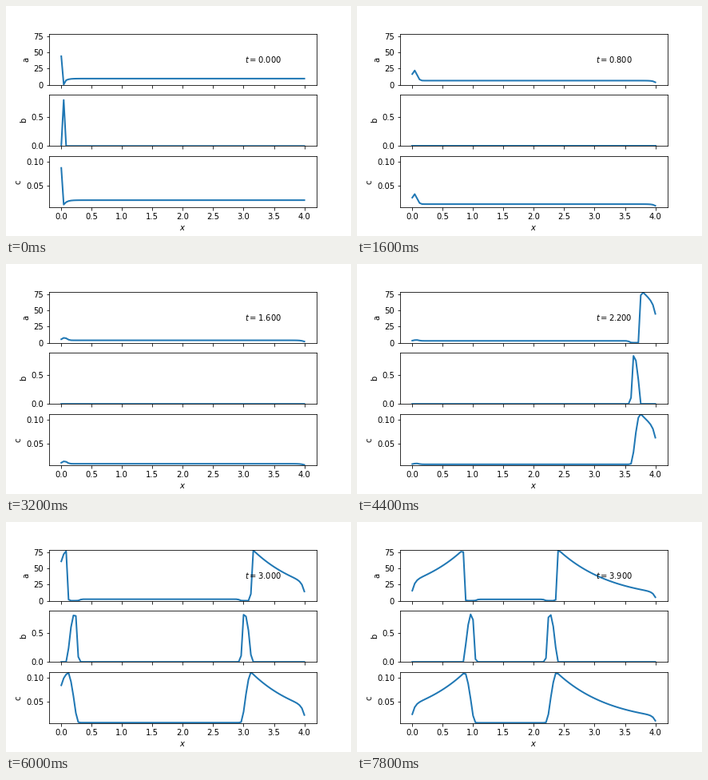
Animation of 432x288 px, one loop 8000 ms. Source, as a matplotlib script:

```python
import numpy as np
import matplotlib.pyplot as plt
from matplotlib.animation import FuncAnimation

plt.rcParams.update({"font.family": "DejaVu Sans", "font.size": 10})

FRAMES, INTERVAL, DT = 40, 200, 0.1
LENGTH = 4.0
ACCEL = 0.0229       # slow speed-up of both fronts
C_REST = 0.0056
C_JUMP = 0.106       # catalyst produced by one pulse
x = np.linspace(0, LENGTH, 101)


def step(u):
    return 0.5 * (1 + np.tanh(u / 2))


def b_pulse(z):
    """Steep front, rounded back; z is the distance behind the front."""
    back = 1 - (np.clip(z, 0, 0.157) / 0.157)**2.4
    return 0.89 * step((z + 0.002) / 0.009) * back


def a_gate(z):
    """a vanishes inside the pulse and returns sharply at its rear."""
    return step((-0.05 - z) / 0.011) + step((z - 0.157) / 0.005)


# c rises as the running integral of b
z_fine = np.linspace(-0.1, 0.2, 301)
c_rise = np.cumsum(b_pulse(z_fine))
c_rise /= c_rise[-1]


def front(t, d, t0, s0, v):
    """Distance behind the front and time since the pulse, at distance d from the wall."""
    tau = t - t0
    z = s0 + v * tau + ACCEL * tau**2 - d
    passed = t0 + (np.sqrt(v**2 + 4 * ACCEL * (d - s0)) - v) / (2 * ACCEL)
    return z, np.clip(t - passed - 0.17, 0, None)


def start_state():
    """A pulse sitting on the second grid point."""
    dip = np.exp(-(x - x[1]) / 0.05)
    a = 9.4 - 5.5 * dip
    b = np.zeros_like(x)
    c = 0.0196 - 0.0092 * dip
    a[:2] = 44, 0.3
    b[1] = 0.8
    c[0] = 0.087
    return a, b, c


def state(t):
    if t == 0:
        return start_state()
    # uniform decay plus the failed pulse fading at the left wall
    c = C_REST + 0.0144 * np.exp(-1.15 * t)
    c = c + 0.083 * np.exp(-1.72 * t - ((x - 0.021 - 0.02 * t) / 0.056)**2)

    b = np.full_like(x, 0.002)
    gate = np.ones_like(x)
    leak = np.ones_like(x)
    right_leak = 0.38 * (1 - np.exp(-t / 0.5))
    shorten = 1 + 0.2 * np.exp(-(t - 2.2) / 0.6)
    waves = ((x, 3.0, 0.258, 0.817, 0, 1),
             (LENGTH - x, 2.2, 0.38, 0.7817, right_leak, shorten))
    for d, t0, s0, v, rest_leak, squeeze in waves:
        z, age = front(t, d, t0, s0, v)
        z = np.where(z > 0, z * squeeze, z)
        b += b_pulse(z)
        c += C_JUMP * np.interp(z, z_fine, c_rise) * np.exp(-0.97 * age)
        gate *= a_gate(z)
        depth = np.where(z > 0, 0.52 * (1 - np.exp(-age / 0.47)), rest_leak)
        leak *= 1 - depth * np.exp(-d / 0.04)

    c = np.maximum(c * leak, C_REST)
    a = 750 * (c - 0.003) * gate
    return a, b, c


fig, axes = plt.subplots(3, 1, sharex=True, figsize=(6, 4), dpi=72)
fig.subplots_adjust(left=0.125, right=0.9, bottom=0.125, top=0.88, hspace=0.2)

panels = (("a", (0, 79), 25, "%d"),
          ("b", (0, 0.888), 0.5, "%.1f"),
          ("c", (0.0048, 0.1115), 0.05, "%.2f"))
lines = []
for ax, (name, (low, high), gap, fmt) in zip(axes, panels):
    lines += ax.plot(x, np.zeros_like(x), color="#1f77b4", lw=2)
    ax.set_xlim(-0.2, 4.2)
    ax.set_ylim(low, high)
    ticks = np.arange(np.ceil(low / gap) * gap, high, gap)
    ax.set_yticks(ticks, [fmt % v for v in ticks])
    ax.set_ylabel(name)
axes[-1].set_xticks(np.arange(0, 4.1, 0.5))
axes[-1].set_xlabel("$x$")
clock = axes[0].text(0.8, 0.43, "", transform=axes[0].transAxes,
                     ha="center", va="baseline")


def update(i):
    t = i * DT
    for line, y in zip(lines, state(t)):
        line.set_ydata(y)
    clock.set_text(f"$t = {t:.3f}$")
    return [*lines, clock]


anim = FuncAnimation(fig, update, frames=FRAMES, interval=INTERVAL,
                     repeat=True, repeat_delay=0, blit=False)
plt.show()
```
